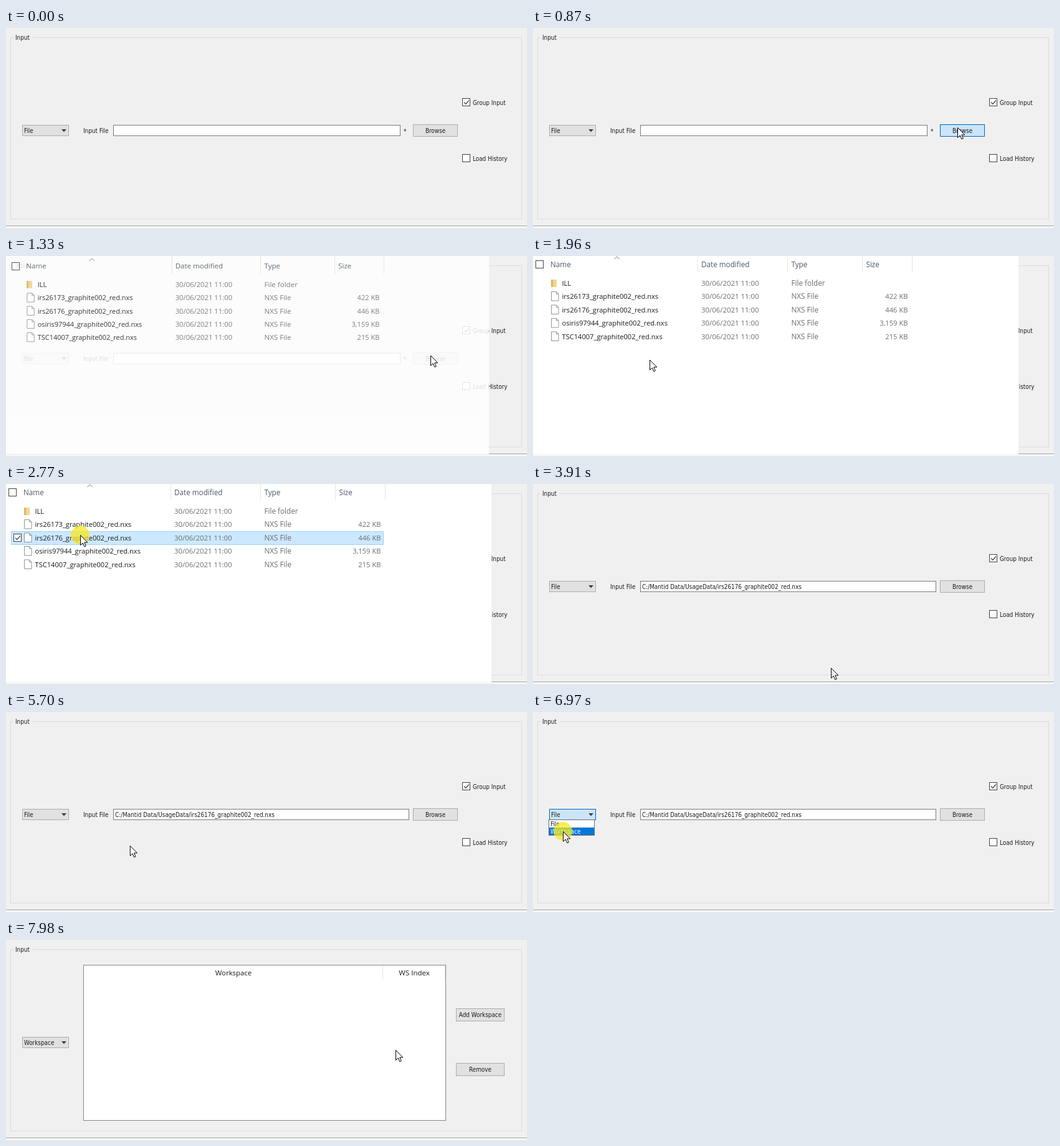
Animation of 836 by 322 pixels, one loop 8000 ms. Source, as an HTML page:

```html
<!DOCTYPE html>
<html lang="en">
<head>
<meta charset="utf-8">
<title>Choosing an input file</title>
<style>
  html, body { margin: 0; height: 100%; overflow: hidden; background: #f0f0f0; }
  svg { display: block; width: 836px; height: 322px; font-family: "DejaVu Sans Condensed", "Open Sans", sans-serif; }
  #dialog, #workspaceTable { font-family: "Open Sans", "Noto Sans", sans-serif; }
  rect { shape-rendering: crispEdges; }
</style>
</head>
<body>
<svg id="stage" viewBox="0 0 836 322"></svg>
<script>
const LOOP = 8000;
const stage = document.getElementById('stage');

// Markup helpers
const text = (x, y, s, { size = 9.85, fill = '#1c1c1c', anchor = 'start', id = '' } = {}) =>
  `<text ${id && `id="${id}"`} x="${x}" y="${y}" font-size="${size}" fill="${fill}" text-anchor="${anchor}">${s}</text>`;
const box = (x, y, w, h, fill, stroke = 'none', id = '') =>
  `<rect ${id && `id="${id}"`} x="${x + .5}" y="${y + .5}" width="${w}" height="${h}" fill="${fill}" stroke="${stroke}"/>`;
const bar = (x, y, w, h, fill) => `<rect x="${x}" y="${y}" width="${w}" height="${h}" fill="${fill}"/>`;
const group = (id, ...parts) => `<g id="${id}">${parts.join('')}</g>`;
const button = (x, y, w, h, label, id) =>
  box(x, y, w, h, '#e1e1e1', '#adadad', id) + text(x + w / 2 + .5, y + h / 2 + 4.2, label, { anchor: 'middle' });
const tick = (x, y) => `<path d="M${x + 3} ${y + 6.5}l2.8 3l5-6" fill="none" stroke="#444" stroke-width="1.2"/>`;
const checkbox = (x, y, checked) => box(x, y, 12, 12, '#fff', '#444') + (checked ? tick(x, y) : '');

// File list
const ROW = 21.5, FIRST = 43.5;
const files = [
  ['ILL', 'File folder', ''],
  ['irs26173_graphite002_red.nxs', 'NXS File', '422 KB'],
  ['irs26176_graphite002_red.nxs', 'NXS File', '446 KB'],
  ['osiris97944_graphite002_red.nxs', 'NXS File', '3,159 KB'],
  ['TSC14007_graphite002_red.nxs', 'NXS File', '215 KB'],
];
const grey = '#6d6d6d', heading = '#4c5a6b';
const folderIcon = y => bar(29, y - 6, 9, 12, '#f3d58d') + bar(29, y - 6, 3, 12, '#dcb560');
const pageIcon = y =>
  `<path d="M29.5 ${y - 7.5}h8l3.5 3.5v11h-11.5zm8 0v3.5h3.5" fill="#fff" stroke="#8a8a8a" stroke-width=".9"/>`;
const fileRow = ([name, type, size], i) => {
  const y = FIRST + i * ROW, base = y + 4.3;
  return (i ? pageIcon(y) : folderIcon(y)) +
    text(46.5, base, name, { size: 11.1 }) +
    text(270, base, '30/06/2021 11:00', { size: 11.4, fill: grey }) +
    text(414.5, base, type, { size: 11.7, fill: grey }) +
    text(601.5, base, size, { size: 11.2, fill: grey, anchor: 'end' });
};
const columns = [[28, 'Name'], [270, 'Date modified'], [414.5, 'Type'], [534.5, 'Size']];

stage.innerHTML = [
  bar(0, 0, 836, 322, '#f0f0f0'),
  box(7, 15, 820, 292, 'none', '#dcdcdc'),
  bar(12, 10, 30, 10, '#f0f0f0'),
  text(15, 19, 'Input'),
  bar(0, 318, 836, 1, '#a5a5a5'),
  box(26, 156, 74, 17, '#e1e1e1', '#adadad', 'combo'),
  text(29, 169, '', { id: 'mode' }),
  '<path d="M89 163h8l-4 4.5z" fill="#404040"/>',
  group('fileForm',
    text(124, 169, 'Input File'),
    group('emptyField', box(172, 156, 460, 17, '#fff', '#7a7a7a'), text(638, 170, '*')),
    group('filledField', box(172, 156, 474, 17, '#fff', '#7a7a7a'),
      text(175, 169, 'C:/Mantid Data/UsageData/irs26176_graphite002_red.nxs')),
    button(653, 155, 71, 19, 'Browse', 'browse'),
    checkbox(732, 113, true), text(749, 123.5, 'Group Input'),
    checkbox(732, 203, false), text(749, 214, 'Load History')),
  group('workspaceForm',
    group('workspaceTable',
      box(124, 40, 581, 250, '#fff', '#828790'),
      bar(604, 41, 1, 23, '#e5e5e5'), bar(704, 41, 1, 23, '#e5e5e5'),
      text(365, 57, 'Workspace', { size: 11.4, anchor: 'middle' }),
      text(655, 57, 'WS Index', { size: 11.5, anchor: 'middle' })),
    button(722, 110, 77, 20, 'Add Workspace'),
    button(722, 198, 77, 20, 'Remove')),
  group('popup',
    box(25, 173, 73, 25, '#fff', '#5a6a80'),
    '<rect id="choice" x="26" width="72" height="12" fill="#0078d7"/>',
    text(28, 183.5, 'File', { id: 'item0' }), text(28, 196, 'Workspace', { id: 'item1' })),
  group('dialog',
    bar(-100, -100, 879, 600, '#fff'),
    group('rowMark', box(8, 0, 597, 21, 'inherit', 'inherit'), checkbox(12, 4, false), group('rowTick', tick(12, 4))),
    checkbox(4, 7, false),
    '<path d="M130.5 5l4-4 4 4" fill="none" stroke="#777"/>',
    ...columns.map(([x, s]) => text(x, 17.5, s, { size: 11.7, fill: heading })),
    ...[264, 408, 528, 608].map(x => bar(x, -10, 1, 36, '#e5e5e5')),
    ...files.map(fileRow)),
  '<circle id="halo" r="15" fill="#f6ea20" opacity=".75"/>',
  '<path id="cursor" d="M.5 .5v16l3.8-3.5 2.5 5.8 2.5-1-2.5-5.8h5z" fill="#fff" stroke="#000"/>',
  bar(0, 319, 836, 3, '#f6f6f6'),
].join('');

const el = Object.fromEntries([...stage.querySelectorAll('[id]')].map(e => [e.id, e]));
const show = (e, on) => e.setAttribute('display', on ? 'inline' : 'none');
const paint = (e, fill, stroke) => { e.setAttribute('fill', fill); e.setAttribute('stroke', stroke); };
const place = (e, x, y) => e.setAttribute('transform', `translate(${x} ${y})`);

const moves = [
  [200, 870, 10, 681, 160, 0],
  [1410, 1830, 7, 188, 172, 0],
  [1960, 1960, 1, 187, 167, 0],
  [2030, 2160, 3, 128, 62, 0],
  [2370, 2440, 2, 119, 82, 0],
  [3490, 3910, 7, 478, 296, 0],
  [5300, 5970, 10, 47, 171, 0],
  [6300, 6500, 4, 48, 192, 0],
  [7500, 7980, 7, 625, 177, 28],
];
const clicks = [[930, 1070], [2770, 2900], [6170, 6300], [6970, 7100]];

function pointer(t) {
  let x = 390, y = 316;
  for (const [start, end, steps, tx, ty, sag] of moves) {
    if (t < start) break;
    const step = t >= end ? steps : 1 + Math.floor((t - start) / (end - start) * (steps - 1));
    const p = step / steps, e = p * p * (3 - 2 * p);
    x += (tx - x) * e;
    y += (ty - y) * e + 4 * sag * e * (1 - e);
  }
  return [x, y];
}

function dialogOpacity(t) {
  if (t < 1200 || t >= 3300) return 0;
  if (t < 1410) return 1 - (1 - (t - 1200) / 210) ** 2;
  return t < 3090 ? 1 : (3300 - t) / 280;
}

function draw(t) {
  const within = (a, b) => t >= a && t < b;
  const [x, y] = pointer(t);

  show(el.cursor, t >= 200);
  place(el.cursor, x, y);
  show(el.halo, clicks.some(([a, b]) => within(a, b)));
  place(el.halo, x, y);

  const opacity = dialogOpacity(t);
  show(el.dialog, opacity > 0);
  el.dialog.setAttribute('opacity', opacity);
  el.dialog.setAttribute('transform', `translate(415 260) scale(${.92 + .08 * opacity}) translate(-415 -260)`);
  const row = Math.floor((y - FIRST) / ROW + .5), selected = t >= 2770;
  show(el.rowMark, t > 1410 && row >= 0 && row < files.length);
  show(el.rowTick, selected);
  place(el.rowMark, 0, Math.floor(FIRST + row * ROW - 10.5));
  paint(el.rowMark, selected ? '#cce8ff' : '#e5f3ff', selected ? '#99d1ff' : '#e5f3ff');

  const workspace = t >= 7100, loaded = t >= 3560;
  show(el.fileForm, !workspace);
  show(el.workspaceForm, workspace);
  show(el.emptyField, !loaded);
  show(el.filledField, loaded);
  el.mode.textContent = workspace ? 'Workspace' : 'File';

  const hot = (e, on) => paint(e, on ? '#cce4f7' : '#e1e1e1', on ? '#0067b8' : '#adadad');
  hot(el.browse, within(800, 1070));
  hot(el.combo, within(5900, 7100));

  const second = y >= 186;
  show(el.popup, within(6230, 7100));
  el.choice.setAttribute('y', second ? 186 : 174);
  el.item0.setAttribute('fill', second ? '#1c1c1c' : '#fff');
  el.item1.setAttribute('fill', second ? '#fff' : '#1c1c1c');
}

function frame() {
  draw(performance.now() % LOOP);
  requestAnimationFrame(frame);
}
frame();
</script>
</body>
</html>
```
